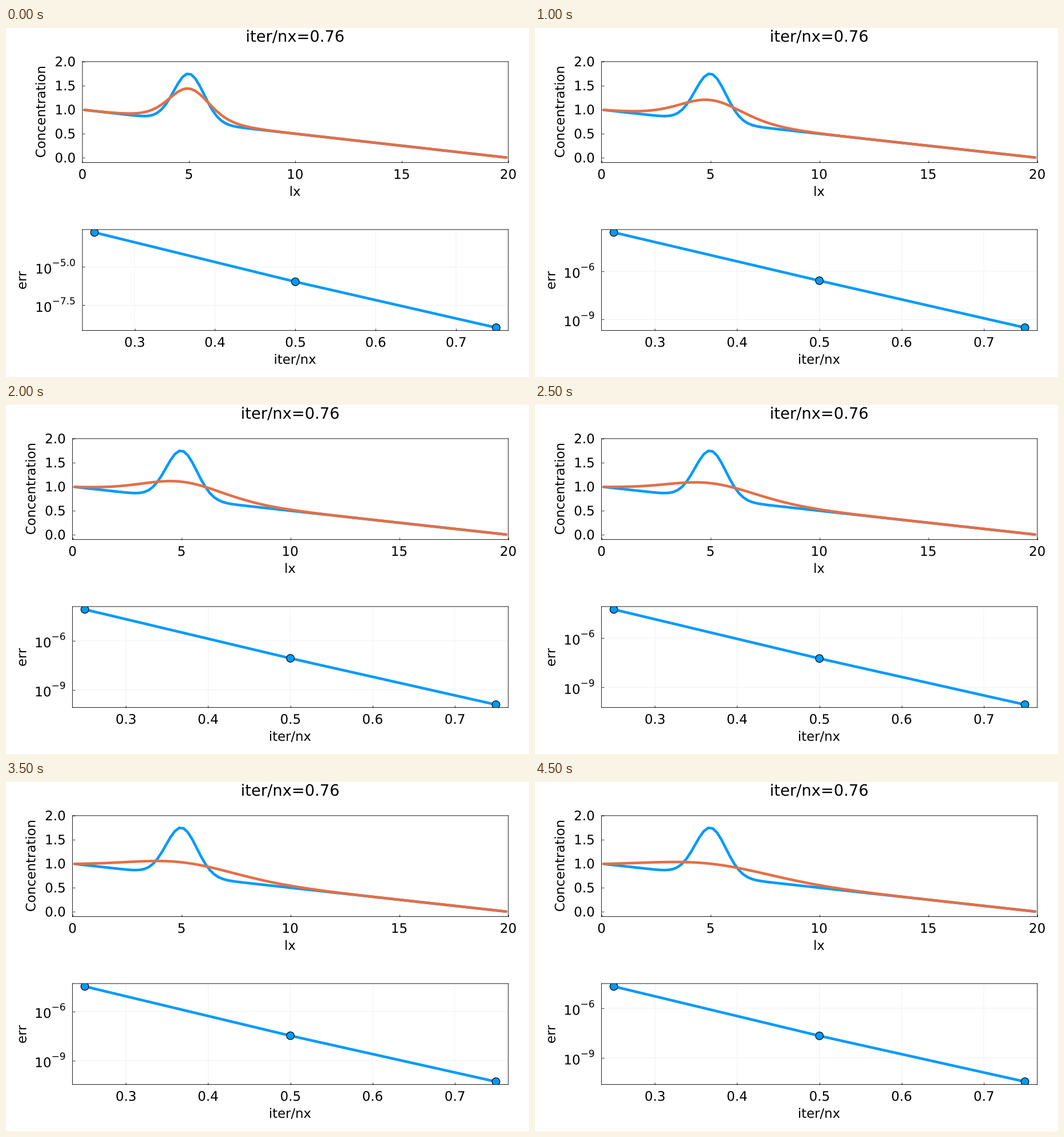
A matplotlib script that plays this animation: 917 by 611 pixels, repeating every 5000 ms.

```python
import matplotlib.pyplot as plt
import numpy as np
from matplotlib.animation import FuncAnimation
from matplotlib.patches import Circle, PathPatch
from matplotlib.textpath import TextPath
from matplotlib.transforms import Affine2D, IdentityTransform

W, H, DPI = 917, 611, 64
PX = 72 / DPI                    # points per pixel
BLUE, ORANGE, GRID = "#009AFA", "#E36F47", "#F1F1F1"
TICK, LABEL, TITLE, SUP = 23.1, 22.8, 27.4, 17.0
RIGHT = 880.7
MINUS = "\u2212"

# Unsnapped paths keep thin lines and glyphs at sub-pixel positions
plt.rcParams.update({"font.family": "DejaVu Sans", "path.snap": False})

# Implicit diffusion of a Gaussian bump on a linear slope, ends held fixed
LX, NX, DT, STEPS = 20.0, 100, 0.4, 10
dx = LX / NX
xc = (np.arange(NX) + 0.5) * dx
start = 1 + np.exp(-(xc - LX / 4) ** 2) - xc / LX
r = DT / dx ** 2
A = np.eye(NX)
for k in range(1, NX - 1):
    A[k, k - 1:k + 2] = -r, 1 + 2 * r, -r
states = [start]
for _ in range(STEPS):
    states.append(np.linalg.solve(A, states[-1]))

# log10 of the residual at each of the three checks, by time step
checks = np.array([0.25, 0.5, 0.75])
known = np.log([1, 2, 3, 4, 6, 8, 10])
residuals = [
    [-2.743, -3.226, -3.59, -3.87, -4.26, -4.484, -4.68],
    [-5.963, -6.24, -6.585, -6.86, -7.243, -7.484, -7.666],
    [-8.959, -9.22, -9.50, -9.723, -10.05, -10.28, -10.434],
]

fig = plt.figure(figsize=(W / DPI, H / DPI), dpi=DPI, facecolor="white")


def text(x, y, s, size=TICK, ha="center", rotation=0):
    path = TextPath((0, 0), s, size=size)
    box = path.get_extents()
    shift = -(box.x0 + box.x1) / 2 if ha == "center" else 0
    place = Affine2D().translate(shift, 0).rotate_deg(rotation)
    fig.add_artist(PathPatch(path, fc="black", ec="none", lw=0,
                             transform=place.translate(x, H - y)))


def panel(left, top, xlim, ylim, xticks, yticks):
    bottom = top + 176.7
    ax = fig.add_axes([left / W, 1 - bottom / H,
                       (RIGHT - left) / W, (bottom - top) / H])
    ax.set(xlim=xlim, ylim=ylim, xticks=xticks, yticks=yticks)
    ax.tick_params(direction="in", length=4 * PX, width=0.8 * PX,
                   labelbottom=False, labelleft=False)
    for spine in ax.spines.values():
        spine.set_linewidth(0.9 * PX)

    def to_px(x, y):
        return (left + (x - xlim[0]) / (xlim[1] - xlim[0]) * (RIGHT - left),
                bottom - (y - ylim[0]) / (ylim[1] - ylim[0]) * (bottom - top))
    return ax, to_px


def pad(lo, hi):
    m = 0.03 * (hi - lo)
    return lo - m, hi + m


def draw_profile(left, step):
    xticks, yticks = range(0, 21, 5), np.arange(0, 2.1, 0.5)
    ax, to_px = panel(left, 58.9, (0, LX), (-0.1, 2.0), xticks, yticks)
    for values, color in ((start, BLUE), (states[step], ORANGE)):
        ax.plot(xc, values, color=color, lw=4.6 * PX,
                solid_capstyle="round", solid_joinstyle="round")
    for t in xticks:
        text(to_px(t, 0)[0], 264.1, str(t))
    for t in yticks:
        text(left - 48.5, to_px(0, t)[1] + 8.2, f"{t:.1f}", ha="left")
    mid = (left + RIGHT) / 2
    text(mid, 24.0, "iter/nx=0.76", TITLE)
    text(mid, 293.9, "lx", LABEL)
    text(left - 65.2, 147.0, "Concentration", LABEL, rotation=90)


def draw_error(left, step):
    err = [np.interp(np.log(step), known, row) for row in residuals]
    xticks = np.arange(3, 8) / 10
    if step == 1:
        yticks, digits, base = (-5.0, -7.5), 1, 51.2
    else:
        yticks, digits, base = (-6, -9), 0, 50.2
    ax, to_px = panel(left, 352.9, pad(checks[0], checks[-1]),
                      pad(err[-1], err[0]), xticks, yticks)
    ax.set_axisbelow(True)
    ax.grid(color=GRID, lw=PX)
    ax.plot(checks, err, color=BLUE, lw=4.6 * PX, solid_capstyle="round")
    for point in zip(checks, err):
        x, y = to_px(*point)
        ax.add_patch(Circle((x, H - y), 6.8, fc=BLUE, ec="black", lw=1.2 * PX,
                            zorder=2.2, transform=IdentityTransform()))
    for t in xticks:
        text(to_px(t, 0)[0], 558.1, f"{t:.1f}")
    for t in yticks:
        y = to_px(0, t)[1]
        text(base, y + 11.4, "10", ha="left")
        text(base + 29.4, y - 1.7, f"{MINUS}{-t:.{digits}f}", SUP, ha="left")
    text((left + RIGHT) / 2, 587.9, "iter/nx", LABEL)
    text(35.5, 441.2, "err", LABEL, rotation=90)


def update(i):
    fig.clear()
    left = 134.0 if i == 0 else 116.6
    draw_profile(left, i + 1)
    draw_error(left, i + 1)
    return []


anim = FuncAnimation(fig, update, frames=STEPS, init_func=lambda: update(0),
                     interval=500, repeat=True, repeat_delay=0, blit=False)
plt.show()
```
